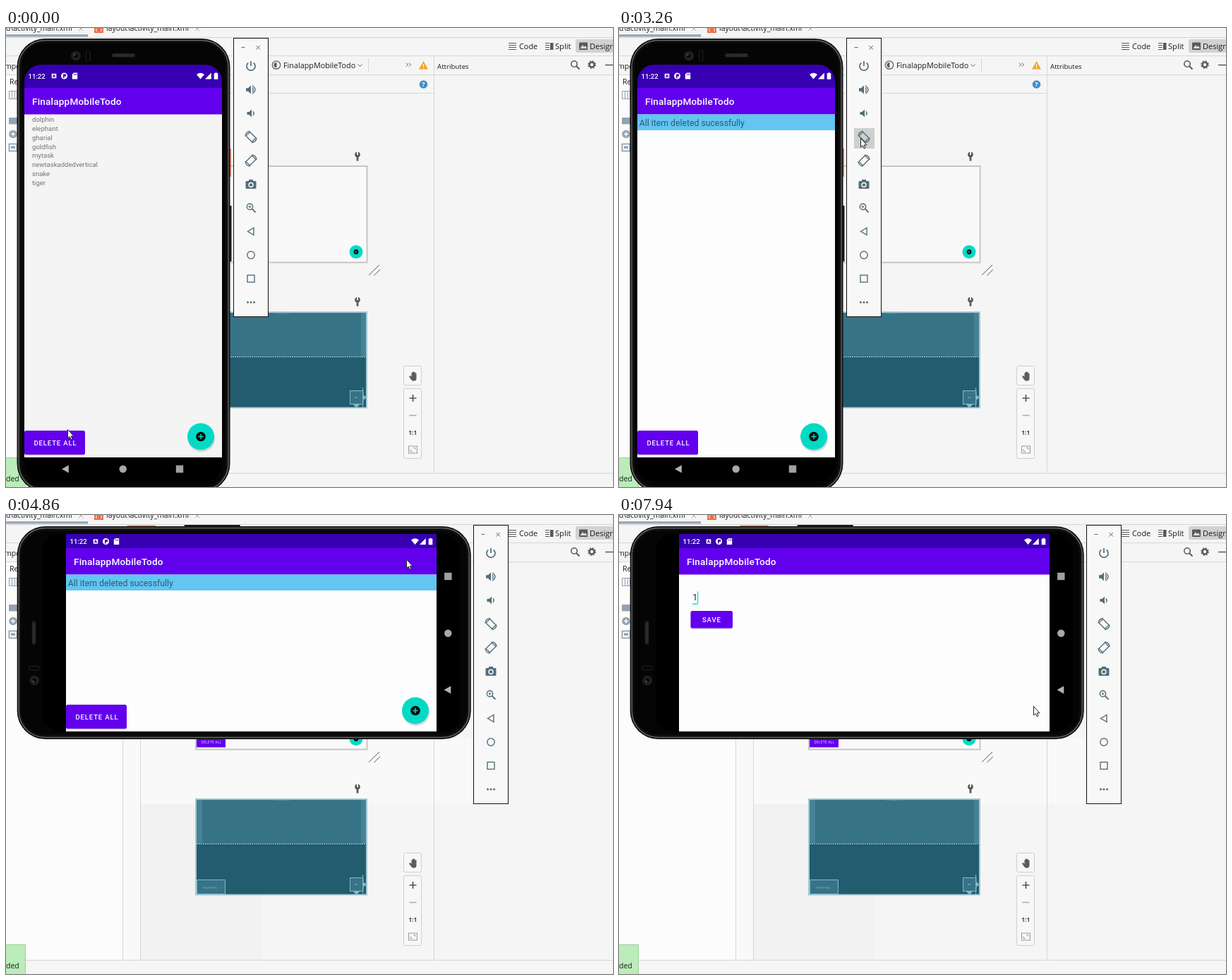
Recreate the animation shown at these times as an HTML page. Size 860 by 651 pixels, loop 8000 ms.

```html
<!DOCTYPE html>
<html lang="en">
<head>
<meta charset="utf-8">
<title>Todo app in an emulator</title>
<style>
html, body { margin: 0; width: 100%; height: 100%; overflow: hidden; background: #f5f5f5; }
svg { display: block; width: 100vw; height: 100vh; }
text { font-family: Roboto, sans-serif; white-space: pre; }
.ide text { font-family: "Open Sans", "Noto Sans", sans-serif; }
</style>
</head>
<body>
<svg id="stage" viewBox="0 0 860 651"></svg>
<script>
const LOOP = 8000;
const PURPLE = '#6200ee', DARK = '#3700b3', TEAL = '#03dac5', BLUE = '#62c5f2', SLATE = '#546e7a';

// Shape helpers: each returns SVG markup
const rect = (x, y, w, h, fill, more = '') => `<rect x="${x}" y="${y}" width="${w}" height="${h}" fill="${fill}" ${more}/>`;
const circle = (x, y, r, fill, more = '') => `<circle cx="${x}" cy="${y}" r="${r}" fill="${fill}" ${more}/>`;
const fill = (d, color, more = '') => `<path d="${d}" fill="${color}" ${more}/>`;
const line = (d, color, width = 1, more = '') => `<path d="${d}" fill="none" stroke="${color}" stroke-width="${width}" ${more}/>`;
const text = (x, y, s, size, color, more = '') => `<text x="${x}" y="${y}" font-size="${size}" fill="${color}" ${more}>${s}</text>`;
const group = (transform, body, more = '') => `<g transform="${transform}" ${more}>${body}</g>`;
const at = (x, y, body) => group(`translate(${x} ${y})`, body);
const border = (color, width = 1) => `stroke="${color}" stroke-width="${width}"`;
const MEDIUM = 'font-weight="500"';

// Latest entry whose time has been reached
const step = (rows, t) => rows.filter(r => r[0] <= t).pop();

function wrench(x, y) {
  return at(x, y, circle(0, -2.5, 3.8, '#595959') + rect(-1, -6.5, 2, 4.5, '#f5f5f5') + line('M0 0V6.5', '#595959', 2.8));
}

function preview() {
  return rect(269, 196, 242.5, 136.5, '#f9f9f9', border('#c6c6c6', 2)) +
    rect(270, 315, 41, 14.5, PURPLE) +
    text(276.5, 323.5, 'DELETE ALL', 4.6, '#fff', MEDIUM + ' letter-spacing=".4"') +
    circle(496, 317.5, 9.5, TEAL) + circle(496, 317.5, 3.4, '#111') + circle(496, 317.5, 1, TEAL) +
    line('M514 350.5L529 336M521.5 351L530 342.5', '#555') + wrench(498, 182) + wrench(498, 388);
}

function blueprint() {
  const pale = '#82b9ca';
  return rect(269, 403, 242, 135.5, '#377387', border('#a5c8d3', 2)) +
    rect(270, 404, 8, 62, '#458296') + rect(503, 404, 7, 62, '#458296') +
    rect(270, 466, 240, 71.5, '#235c6e') +
    line('M270 466.5H511', '#a4d3e0', 1, 'stroke-dasharray="2 1"') +
    text(377, 405, 'FinalappTodo', 4, pale) +
    rect(270.5, 517.5, 40, 20, '#377387', border(pale)) +
    text(279, 529.5, 'DELETE ALL', 3.8, pale) +
    rect(487.5, 514.5, 18.5, 19, '#377387', border(pale)) +
    line('M494 524H498M505.5 510V538', pale, 1, 'stroke-dasharray="4 2"') +
    fill('M506 520L511 524L506 528ZM492 534H501L496.5 539Z', pale);
}

function zoomPanel() {
  const box = 'rx="2" ' + border('#cfcfcf');
  const hand = 'M-6 0L-4 -1L-2.5 1V-5H-1V-1V-6.5H.8V-1V-6H2.6V0V-4.5H4.5V3Q4.5 6.5 1 6.5H-1Q-3.5 5 -6 0Z';
  return rect(563.5, 479.5, 25, 27, '#f7f7f7', box) + rect(563.5, 511.5, 25, 99, '#f7f7f7', box) +
    at(577, 494, fill(hand, '#5c5c5c')) +
    line('M571.5 525H581.5M576.5 520V530', '#555', 1.7) + line('M571.5 549.5H581.5', '#aaa', 1.5) +
    text(570.3, 577, '1:1', 8.4, '#444', 'font-weight="700"') +
    rect(570.5, 593, 12, 10, 'none', border('#999')) + line('M573 600V597.5M573 600.5H576M580 596V598M577 595.5H580', '#999');
}

function ide(t) {
  const rule = '#d6d6d6', ink = '#1c1c1c', icon = '#595959', tool = '#94a3b3';
  let s = rect(0, 0, 860, 651, '#f5f5f5') + rect(0, 67, 165, 564, '#fcfcfc') + rect(166, 67, 24, 564, '#f9f9f9');
  if (t >= 3510) s += rect(190, 410, 172, 221, '#f2f2f2');
  if (t >= 3660) s += rect(190, 317, 472, 93, '#f9f9f9');
  s += line('M0 13.5H860M0 39.5H860M0 66.5H860M190 92.5H606M606.5 40V631M0 631.5H860M165.5 67V631M190.5 67V631', rule);
  // Editor tabs
  s += rect(0, 9, 116, 3.5, '#9ba8ba') + text(0, 4, 'd\\activity_main.xml', 10.4, ink) + text(142, 4, 'layout\\activity_main.xml', 10.4, ink) +
    rect(125, 0, 13, 7, '#e8704f') + line('M129 1L127 3L129 5M134 1L136 3L134 5', '#fff') +
    line('M103 -2L109 4M109 -2L103 4M268 -2L274 4M274 -2L268 4', '#aaa');
  // View switch
  s += rect(807, 16, 60, 19, '#d2d2d2', 'rx="3"') +
    line('M712 21.5H723M712 24.5H723M712 27.5H723M712 30.5H723M764 21.5H770M764 24.5H770M764 27.5H770M764 30.5H770', icon, 1.2) +
    rect(771, 21, 4.5, 10, icon) + rect(812, 20.5, 12, 10.5, icon, 'rx="1"') + fill('M813.5 29L817 24L819 27L821 25L823 29Z', '#ddd') +
    text(727, 30, 'Code', 10.9, ink) + text(778, 30, 'Split', 11.1, ink) + text(827, 30, 'Design', 11, ink);
  // Toolbar and attributes header
  s += circle(383, 52.5, 5.7, 'none', border(icon, 1.2)) + fill('M383 49A3.5 3.5 0 0 0 383 56Z', icon) + line('M383 49V56', icon) +
    text(393, 57, 'FinalappMobileTodo', 10.8, ink) + line('M498.5 51.5L501.5 54.5L504.5 51.5', icon) + line('M513.5 43V62', rule) +
    line('M567 49.5L569.5 52L567 54.5M571 49.5L573.5 52L571 54.5', icon) +
    fill('M591.5 47L598 58.5H585Z', '#eea62b') + line('M591.5 51V55M591.5 56V57.3', '#fff', 1.3) +
    circle(591.5, 80, 5.8, '#3d8fca') + text(589.2, 83.3, '?', 9, '#fff', 'font-weight="700"') +
    text(611, 57.5, 'Attributes', 9.7, ink) +
    circle(805, 51, 4.2, 'none', border(icon, 1.6)) + line('M808 54L812.5 58.5', icon, 2) +
    circle(830, 52, 3.4, 'none', border(icon, 2.4)) + circle(830, 52, 5, 'none', border(icon, 1.6) + ' stroke-dasharray="2.2 1.72"') +
    line('M849 52.5H860', icon, 1.5);
  // Left edge
  s += text(-2, 58, 'mponent', 10.5, ink) + text(5, 80, 'Results', 10.5, ink) +
    rect(4.5, 89.5, 11, 11, 'none', border(tool)) + line('M8.5 89V101M12.5 89V101', tool) +
    rect(4, 127, 13, 9.5, tool, 'rx="1"') + circle(10, 150.5, 5.8, tool) + line('M10 147.5V153.5M7 150.5H13', '#fff', 1.4) +
    rect(4.5, 164.5, 11, 10, 'none', border(tool, 1.8)) + rect(7, 167.5, 6, 3.5, tool);
  s += preview() + blueprint() + zoomPanel();
  s += rect(-5, 609.5, 32.5, 45, '#bcecb9', border('#a0cda0')) + text(0, 643, 'ded', 10.5, ink);
  return `<g class="ide">${s}</g>`;
}

function toolbar(x, t) {
  const o = (d, w = 1.4) => line(d, SLATE, w);
  const edge = border(SLATE, 1.4);
  const spin = rect(-4, -6, 8, 12, 'none', 'rx="1" transform="rotate(-45)" ' + edge) +
    o('M-8 -1Q-7.5 -7.5 -1 -8M8 1Q7.5 7.5 1 8', 1.4);
  const icons = [
    o('M-3.8 -4.5A6 6 0 1 0 3.8 -4.5M0 -7V0', 1.7),
    fill('M-7 -2.2H-4L0 -6V6L-4 2.2H-7Z', SLATE) + o('M2 -3Q4.5 0 2 3M2 -5.7Q10 0 2 5.7'),
    fill('M-5.5 -2H-2.5L1 -5.5V5.5L-2.5 2H-5.5Z', SLATE) + o('M2.8 -2.8Q5.5 0 2.8 2.8'),
    spin, group('scale(-1 1)', spin),
    rect(-7.5, -4.5, 15, 11, SLATE, 'rx="1.5"') + rect(-3, -6.5, 6, 3, SLATE) + circle(0, 1, 3, SLATE, border('#fff', 1.4)),
    circle(-1.5, -1.5, 4.2, 'none', edge) + o('M1.7 1.7L6.5 6.5', 1.8) + o('M-3.5 -1.5H.5M-1.5 -3.5V.5', 1),
    o('M4 -5V5L-4.5 0Z'), circle(0, 0, 5.2, 'none', edge), rect(-5, -5, 10, 10, 'none', edge),
    [-4.5, 0, 4.5].map(dx => circle(dx, 0, 1.5, SLATE)).join('')
  ];
  const hover = t >= 3140 && t < 3510 ? rect(-14, 142, 29, 29, t < 3260 ? '#e2e2e2' : '#cfcfcf') : '';
  return at(x, 0, rect(-24.5, 14.5, 49, 395, '#f8f8f8', border('#111')) +
    o('M-13.5 27.5H-8.5', 1) + o('M7.5 25L13 30.5M13 25L7.5 30.5', 1) + hover +
    icons.map((body, i) => at(0, 54 + i * 33.5, body)).join(''));
}

function phoneBody() {
  return rect(316, 171, 2.8, 40, '#e8704f') + rect(316, 252, 3.5, 79, '#1b1b1b') +
    rect(15.5, 15, 302, 643, '#0e0e0e', 'rx="40"') +
    rect(18, 17.5, 297, 638, 'none', 'rx="37.5" ' + border('#666', 1.4)) +
    rect(22, 21, 289, 631, '#050505', 'rx="33"') +
    rect(150, 36, 33, 5.5, '#242424', 'rx="2.7"') + line('M154 38.7H180', '#3a3a3a', 3, 'stroke-dasharray="1 2"') +
    circle(99, 39.5, 7, '#1d1d1d') + circle(99, 39.5, 4, '#090909', border('#333')) + circle(97.5, 38, 1, '#777') +
    rect(113.5, 32, 5.5, 15, 'none', 'rx="2.5" ' + border('#222'));
}

function status(x, right, y) {
  return text(x + 5.5, y + 3.5, '11:22', 9.5, '#fff', MEDIUM) +
    at(x + 42, y, rect(-3.3, -3.3, 6.6, 6.6, '#fff', 'rx=".6"') + line('M-1.7 2L0 -2L1.7 2M-1 .8H1', DARK)) +
    at(x + 56.5, y, circle(0, 0, 4.5, '#fff') + fill('M0 -2.5H2.5V.5H0V3H-1.5V-2.5Z', DARK)) +
    at(x + 71.5, y, fill('M-1.5 -4.5H3.7V4.5H-3.7V-2.3Z', '#fff') + line('M-1 -3V-1M.8 -3V-1M2.4 -3V-1', DARK, .8)) +
    at(right - 30.5, y, fill('M-5.5 -2Q0 -6.5 5.5 -2L0 4.5Z', '#fff')) +
    at(right - 19.5, y, fill('M4.3 -4.5V4.5H-4.5Z', '#fff')) +
    at(right - 8.5, y, fill('M-1.2 -4.7H1.2V-3.7H2.8V4.7H-2.8V-3.7H-1.2Z', '#fff'));
}

function nav(points) {
  const [back, home, recent] = points;
  return at(...back, fill('M4.8 -5.5V5.5L-5 0Z', '#b0b0b0')) + circle(...home, 5.2, '#a8a8a8') +
    at(...recent, rect(-5.2, -5.2, 10.4, 10.4, '#a0a0a0'));
}

// App window: header at (x, y), content down to (right, bottom)
function app(x, y, right, bottom, bar, body, paper = '#fdfdfd') {
  const w = right - x;
  return rect(x, y, w, bottom - y, paper) + rect(x, y - bar, w, bar, DARK) + rect(x, y, w, 37.5, PURPLE) +
    text(x + 11, y + 24, 'FinalappMobileTodo', 13.6, '#fff', MEDIUM + ' letter-spacing=".17"') + body;
}

function button(x, y, w, h, label, pad) {
  return rect(x, y + 1.3, w, h, '#0003', 'rx="3"') + rect(x, y, w, h, PURPLE, 'rx="2.5"') +
    text(x + pad, y + h / 2 + 3.5, label, 9.54, '#fff', MEDIUM + ' letter-spacing=".85"');
}

function fab(x, y, pressed) {
  return circle(x + 1, y + 2.5, pressed ? 22 : 19.3, '#0002') + circle(x, y, 19, pressed ? '#46e5d6' : TEAL) +
    circle(x, y, 6.8, '#0a0a0a') + line(`M${x - 3.7} ${y}H${x + 3.7}M${x} ${y - 3.7}V${y + 3.7}`, TEAL, 1.5);
}

const message = (x, y, right) => rect(x, y + 37.5, right - x, 22.5, BLUE) +
  text(x + 2.8, y + 53.5, 'All item deleted sucessfully', 12.26, '#0000008a');

const controls = (x, right, bottom, pressed) =>
  button(x, bottom - 38, 86, 34, 'DELETE ALL', 13.5) + fab(right - 30, bottom - 29.5, pressed);

function portrait(t) {
  const words = ['dolphin', 'elephant', 'gharial', 'goldfish', 'mytask', 'newtaskaddedvertical', 'snake', 'tiger'];
  const done = step([[0, 0], [310, .35], [430, .8], [550, 1]], t)[1];
  const list = words.map((w, i) => text(37, 133 + i * 12.86, w, 9.54, '#757575')).join('');
  const body = `<g opacity="${1 - done}">${list}</g><g opacity="${done}">${message(26, 85, 306)}</g>` + controls(26, 306, 609);
  return rect(26, 52, 280, 591, '#000') + app(26, 85, 306, 609, 33, body, done ? '#fdfdfd' : '#f4f4f4') +
    status(26, 306, 68) + nav([[84, 625.5], [165.7, 625.5], [246, 625.5]]);
}

// Landscape window scaled about the screen centre, with black side bars
function wide(scale, body) {
  return group(`translate(347.5 167) scale(${scale}) translate(-347.5 -167)`,
    rect(52, 27, 591, 280, '#000') + app(85, 47, 610, 307, 20, body));
}

function editor(typed) {
  return rect(104, 125.5, 8, typed ? 1.4 : 1, typed ? TEAL : '#999') +
    (typed ? text(104.3, 121.3, '1', 12.3, '#222') + rect(111, 108.5, 1.2, 16.5, TEAL) : '') +
    button(101.5, 136, 59.5, 24.5, 'SAVE', 16.5);
}

const sideways = body => group('translate(.7 333.5) rotate(-90)', body);

function landscape(t) {
  const turning = (angle, body, opacity) => group(`rotate(${angle} 347.5 167)`, body, `opacity="${opacity}"`);
  const list = wide(1, (t < 6350 ? message(85, 47, 610) : '') + controls(85, 610, 307, t >= 6210 && t < 6490));
  const system = status(85, 610, 37.5) + nav([[625.5, 248], [626.3, 167.7], [626.3, 87]]);
  if (t < 4620) return sideways(portrait(t));
  if (t < 4740) return rect(52, 27, 591, 280, '#c8c8c8') + turning(21, sideways(portrait(t)), .55);
  if (t < 4860) return rect(52, 27, 591, 280, '#c8c8c8') + turning(-12, list + system, .85);
  if (t < 6630) return list + system;
  const [, back, front] = step([[6630, 1.038, .966], [6750, 1.05, .99], [6870, 1, 1]], t);
  return wide(back, controls(85, 610, 307)) + wide(front, editor(t >= 7940)) + system;
}

const POINTER = [
  [0, 87, 569], [1960, 233, 401], [2080, 372, 298], [2200, 503, 215], [2320, 468, 176], [2450, 405, 163],
  [2720, 372, 163], [2840, 345, 163], [2990, 342, 156], [4190, 507, 73], [4340, 530, 70], [4470, 546, 67],
  [4620, 567, 62], [4740, 567, 62.5], [5290, 545, 115], [5410, 491, 210], [5530, 520, 290], [5650, 566, 282],
  [5800, 583, 274], [5950, 587, 271]
];

function pointer(t) {
  const [, x, y] = step(POINTER, t);
  return at(x, y, fill('M.5 .5V13L3.2 10.6L5.2 14.8L7.1 14L5.2 9.9H9Z', '#fff', border('#222')));
}

function scene(t) {
  const wideMode = t >= 3660;
  const clip = wideMode ? [52, 27, 591, 280] : [26, 52, 280, 591];
  const screen = `<g clip-path="url(#screen)">${wideMode ? landscape(t) : portrait(t)}</g>`;
  const phone = (wideMode ? sideways(phoneBody()) : phoneBody()) + screen;
  // Only the turning and upright screens show rounded corners; letterboxed ones are black there
  const defs = `<defs><clipPath id="screen">${rect(...clip, '#000', 'rx="24"')}</clipPath>` +
    `<clipPath id="upper">${rect(0, 0, 860, 410, '#000')}</clipPath></defs>`;
  const cut = t >= 3510 && !wideMode ? 'clip-path="url(#upper)"' : '';
  return defs + ide(t) + `<g ${cut}>${phone}</g>` + toolbar(wideMode ? 687 : 347, t) + pointer(t);
}

const stage = document.getElementById('stage');
let shown = '';
function tick() {
  const next = scene(performance.now() % LOOP);
  if (next !== shown) stage.innerHTML = shown = next;
  requestAnimationFrame(tick);
}
tick();
</script>
</body>
</html>
```
